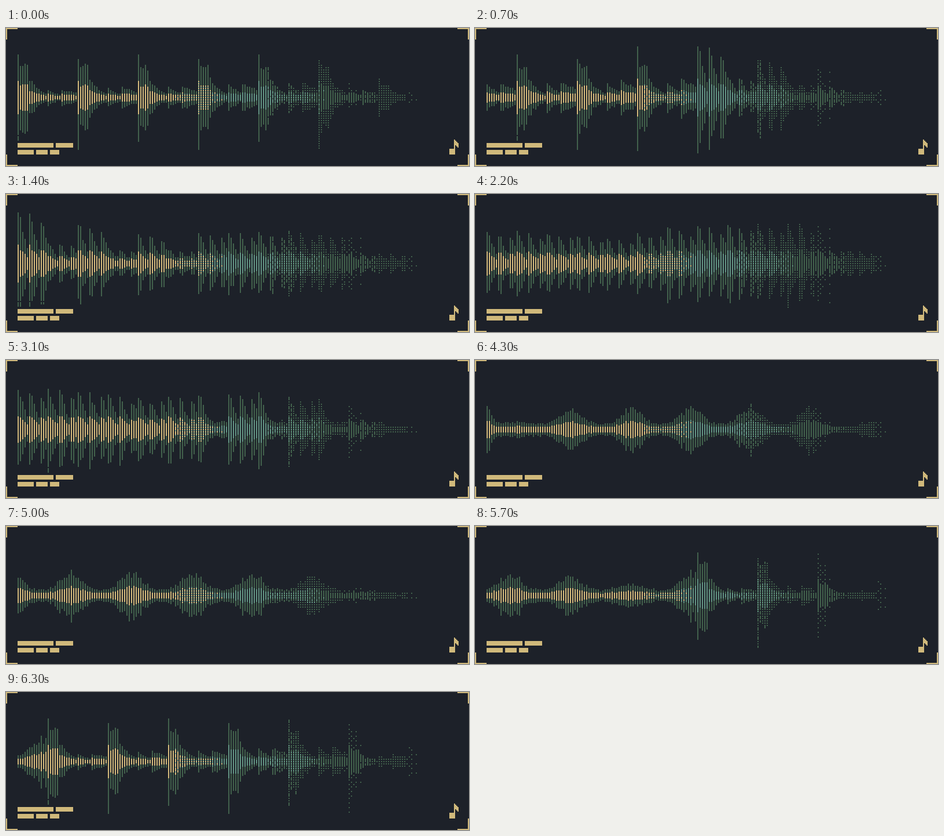
An HTML page with a canvas for the animation above (6.4 s loop, 800x240 px).

```html
<!DOCTYPE html>
<html lang="en">
<head>
<meta charset="utf-8">
<title>Waveform</title>
<style>
html, body { margin: 0; width: 100%; height: 100%; overflow: hidden; background: #1d2129; }
canvas { display: block; width: 800px; height: 240px; image-rendering: pixelated; }
</style>
</head>
<body>
<canvas id="stage" width="400" height="120"></canvas>
<script>
const ctx = document.getElementById('stage').getContext('2d');
const BG = '#1d2129', GREEN = '#42614c', TEAL = '#639483', GOLD = '#d3ba7c', TRIM = '#d0b97b';
const STEP = 13, STEPS = 64, TOTAL = STEP * STEPS, VISIBLE = 173, MID = 60;
const PLUCK_START = 14, SWELL_START = 44;

// Loudness of the plucks by step, and of the swells by bar
const PLUCK_KEYS = [[14, 88], [16, 66], [18, 50], [23, 56], [26, 43], [28, 63],
  [32, 70], [35, 55], [39, 64], [43, 40]];
const SWELL_KEYS = [[569, 5], [595, 24], [673, 28], [777, 26], [803, 8], [829, 30]];

const clamp = (v, a, b) => Math.min(b, Math.max(a, v));
const rand = n => { const s = Math.sin(n * 12.9898) * 43758.5453; return s - Math.floor(s); };
const jitter = (i, seed, amount) => 1 + (rand(i + seed) - 0.5) * amount;
const fade = (x, a, b) => { const t = clamp((x - a) / (b - a), 0, 1); return 1 - t * t * (3 - 2 * t); };

function along(keys, x) {
  const n = keys.findIndex(k => k[0] >= x);
  if (n < 1) return keys[n ? keys.length - 1 : 0][1];
  const [x0, y0] = keys[n - 1], [x1, y1] = keys[n];
  return y0 + (y1 - y0) * (x - x0) / (x1 - x0);
}

// 8 x 8 ordered dither, 0 to 1
function threshold(x, y) {
  let v = 0;
  for (let bit = 0; bit < 3; bit++) {
    const a = x >> bit & 1, b = y >> bit & 1;
    v = v * 4 + (a ^ b) * 2 + b;
  }
  return (v + 0.5) / 64;
}

// Kick on the beat, two soft echoes on the off-beat
function kickLevel(step, p) {
  const beat = step >> 1;
  if (step % 2) {
    const echo = Math.min(25, 13 + 3 * beat), late = 14 + 3 * beat;
    return Math.max(echo * 0.84 ** p, p < 6 ? 0 : late * 0.92 ** (p - 6));
  }
  if (p === 0) return beat < 6 ? 74 : 90;
  return p < 5 ? 57 - p : Math.max(6, 32 * 0.81 ** (p - 5));
}

// Three hits per step, each with a bell-shaped decay
function pluckLevel(step, p) {
  const hit = Math.min(2, Math.floor(p / 5)), k = p - hit * 5;
  let peak = along(PLUCK_KEYS, step) * (1 - 0.09 * hit);
  if (step % 2 && step < 20) peak *= 0.45;
  if (step % 2 && step > 36 && hit) peak *= 0.3;
  return Math.max(12, peak / (1 + 0.12 * k * k));
}

function swellLevel(i) {
  const d = (i + 16) % 26 - 13;
  return 9 + along(SWELL_KEYS, i) * Math.exp(-d * d / 42);
}

function makeBar(i) {
  const step = Math.floor(i / STEP), p = i % STEP;
  const kick = step < PLUCK_START, pluck = !kick && step < SWELL_START;
  const level = kick ? kickLevel(step, p) : pluck ? pluckLevel(step, p) : swellLevel(i);
  let up = level * jitter(i, 7, p === 0 ? 0 : kick || pluck ? 0.2 : 0.4);
  let down = up * jitter(i, 2000, 0.24);
  if (kick && level > 70) {
    const odd = step >> 1 & 1;
    up = level - 7 * odd;
    down = level + 2 + 14 * odd;
  }
  return {
    up: clamp(Math.floor(up / 2), 2, 44),
    down: clamp(Math.floor(down / 2), 2, 48),
    core: clamp(Math.round((up + down) * 0.092), 1, pluck && level < 80 ? 11 : 16)
  };
}

const bars = Array.from({ length: TOTAL }, (_, i) => makeBar(i));

function rect(x, y, w, h, color) {
  ctx.fillStyle = color;
  ctx.fillRect(x, y, w, h);
}

function drawBar(c, bar) {
  const x = 10 + 2 * c, px = 2 * x;
  const gold = fade(px, 275, 382), teal = fade(px, 435, 560);
  const core = fade(px, 606, 719), outer = fade(px, 438, 638);
  for (let y = MID - bar.up; y <= MID + bar.down; y++) {
    if (x < 60 && (y === 93 || y > 97)) continue; // room for the caption
    const t = threshold(2 * c, y + 2);
    const inside = Math.abs(y - MID) <= bar.core;
    if (t > (inside ? core : outer)) continue;
    rect(x, y, 1, 1, !inside ? GREEN : t < gold ? GOLD : t < teal ? TEAL : GREEN);
  }
}

function drawTrim() {
  for (const x of [0, 390]) for (const y of [0, 119]) rect(x, y, 10, 1, TRIM);
  for (const x of [0, 399]) for (const y of [0, 110]) rect(x, y, 1, 10, TRIM);
  for (const [x, w] of [[10, 31], [43, 15]]) rect(x, 100, w, 4, TRIM);
  for (const [x, w] of [[10, 14], [26, 10], [38, 8]]) rect(x, 106, w, 4, TRIM);
  rect(383, 105, 5, 5, TRIM);
  rect(387, 97, 1, 13, TRIM);
  for (let n = 0; n < 3; n++) rect(388 + n, 98 + n, 1, 4, TRIM);
}

let shown = -1;
function tick() {
  const step = Math.floor(performance.now() / 100) % STEPS;
  if (step !== shown) {
    shown = step;
    rect(0, 0, 400, 120, BG);
    for (let c = 0; c < VISIBLE; c++) drawBar(c, bars[(step * STEP + c) % TOTAL]);
    drawTrim();
  }
  requestAnimationFrame(tick);
}
tick();
</script>
</body>
</html>
```
